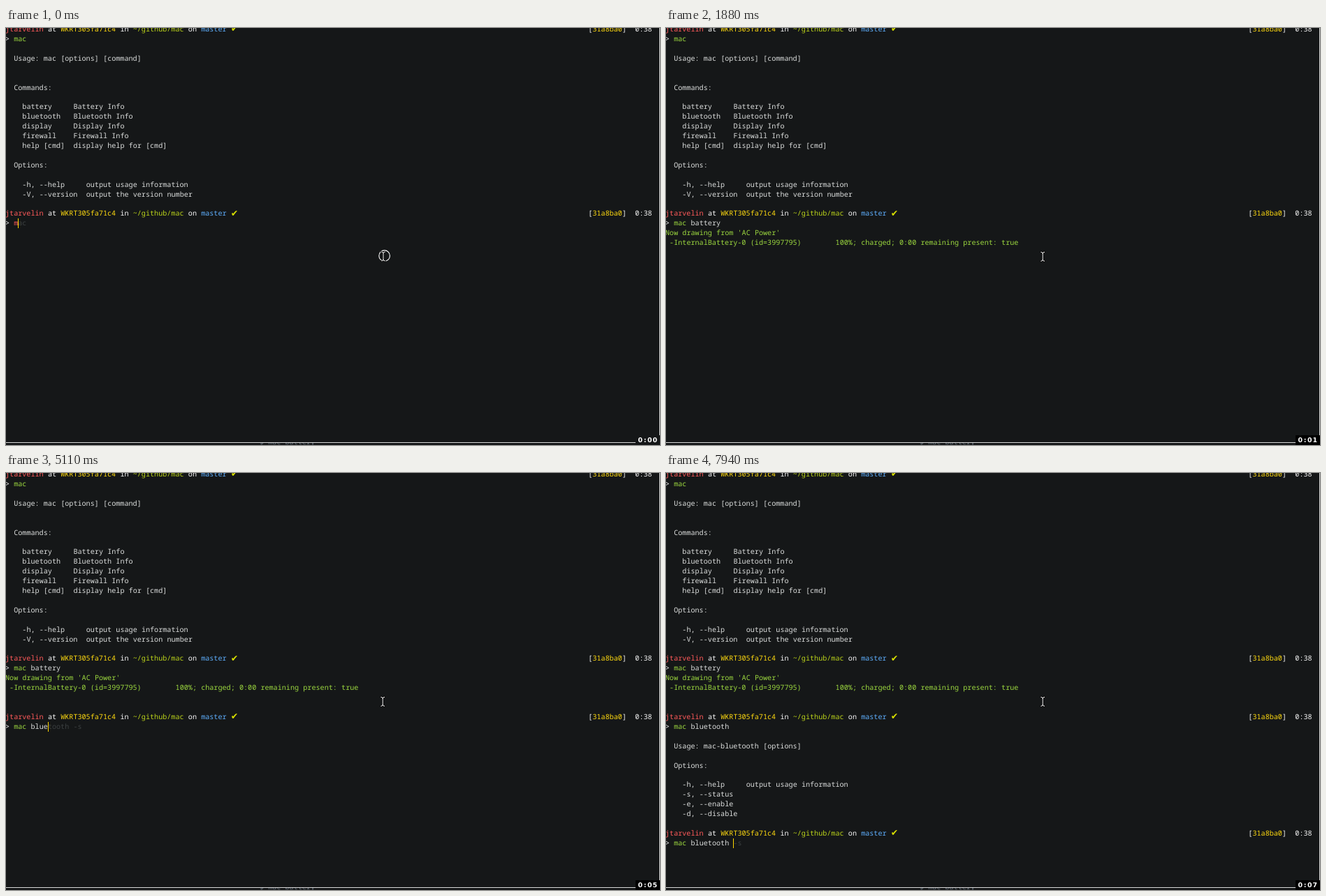
Recreate the animation shown at these times as an HTML page. Size 936 by 598 pixels, loop 8 s.

```html
<!DOCTYPE html>
<html lang="en">
<head>
<meta charset="utf-8">
<title>Terminal session</title>
<style>
  html, body { margin: 0; width: 100%; height: 100%; overflow: hidden; background: #151718; }
  svg { display: block; width: 936px; height: 598px; }
  text { font: 500 10.15px "Noto Sans Mono", "DejaVu Sans Mono", monospace; text-rendering: geometricPrecision; }
  .check { font: 12.5px "DejaVu Sans", sans-serif; }
  .clock text { font: bold 9.4px "DejaVu Sans", sans-serif; fill: #fff; }
</style>
</head>
<body>
<svg viewBox="0 0 936 598">
  <rect width="936" height="598" fill="#151718"/>
  <g id="screen"></g>
  <g id="pointer" fill="none" stroke-linecap="round">
    <circle id="ring" cx="1.6" cy="-.8" r="7.8" stroke="#fff" stroke-width="1.1"/>
    <path d="M-2.5-6.5Q0-6.5 0-4.5Q0-6.5 2.5-6.5M0-4.5V4.5M-2.5 6.5Q0 6.5 0 4.5Q0 6.5 2.5 6.5" stroke="#000" stroke-width="2.6"/>
    <path d="M-2.5-6.5Q0-6.5 0-4.5Q0-6.5 2.5-6.5M0-4.5V4.5M-2.5 6.5Q0 6.5 0 4.5Q0 6.5 2.5 6.5" stroke="#fff"/>
  </g>
  <clipPath id="below"><rect y="595" width="936" height="3"/></clipPath>
  <g clip-path="url(#below)">
    <text x="363" y="597" fill="#66717a">$ mac battery</text>
  </g>
  <rect y="594" width="936" height="1" fill="#d8d8d8"/>
  <rect x="935" width="1" height="595" fill="#d8d8d8"/>
  <g class="clock">
    <rect id="clockBox" x="901" y="584" width="35" height="14"/>
    <text x="904.4" y="594">0</text>
    <text x="912.8" y="594">:</text>
    <text x="918" y="594">0</text>
    <text id="seconds" x="925.6" y="594">0</text>
  </g>
</svg>
<script>
const LOOP = 8000, CELL = 6.09, LINE = 13.92, LEFT = -1, TOP = -5.4;
const C = {
  text: '#dcdedd', white: '#fafafa', red: '#ff5a5a', yellow: '#ffda10', path: '#bcd41a',
  blue: '#5fb0ff', check: '#d9e000', green: '#9cd83f', hint: '#3c4041', cursor: '#ffd700'
};
const $ = id => document.getElementById(id);
const colX = col => LEFT + col * CELL;
const rowY = row => TOP + row * LINE;

function add(parent, tag, attrs, content = '') {
  const node = document.createElementNS('http://www.w3.org/2000/svg', tag);
  for (const key in attrs) node.setAttribute(key, attrs[key]);
  node.textContent = content;
  return parent.appendChild(node);
}

// Every word starts on its own terminal column.
function put(group, row, col, string, fill = C.text) {
  for (const word of string.matchAll(/\S+/g))
    add(group, 'text', { x: colX(col + word.index), y: rowY(row) + 10.4, fill }, word[0]);
}

function prompt(group, row) {
  let col = 0;
  const parts = [['jtarvelin', C.red], ['at', C.white], ['WKRT305fa71c4', C.yellow], ['in', C.white],
    ['~/github/mac', C.path], ['on', C.white], ['master', C.blue]];
  for (const [word, color] of parts) {
    put(group, row, col, word, color);
    col += word.length + 1;
  }
  add(group, 'text', { class: 'check', x: colX(col), y: rowY(row) + 10.8, fill: C.check }, '✔');
  put(group, row, 137, '[', C.white);
  put(group, row, 138, '31a8ba0', C.yellow);
  put(group, row, 145, ']  0:38', C.white);
  put(group, row + 1, 0, '>', C.white);
}

function lines(group, row, list, color) {
  list.forEach((line, i) => put(group, row + i, 0, line, color));
}

const blocks = [];
function block(from, draw) {
  const group = add($('screen'), 'g', {});
  draw(group);
  blocks.push({ from, group });
}

block(0, g => {
  prompt(g, 0);
  put(g, 1, 2, 'mac', C.green);
  lines(g, 3, [
    '  Usage: mac [options] [command]', '', '',
    '  Commands:', '',
    '    battery     Battery Info',
    '    bluetooth   Bluetooth Info',
    '    display     Display Info',
    '    firewall    Firewall Info',
    '    help [cmd]  display help for [cmd]', '',
    '  Options:', '',
    '    -h, --help     output usage information',
    '    -V, --version  output the version number'
  ]);
  prompt(g, 19);
});
block(1880, g => lines(g, 21, [
  "Now drawing from 'AC Power'",
  ' -InternalBattery-0 (id=3997795)        100%; charged; 0:00 remaining present: true'
], C.green));
block(2010, g => prompt(g, 25));
block(6450, g => lines(g, 28, [
  '  Usage: mac-bluetooth [options]', '',
  '  Options:', '',
  '    -h, --help     output usage information',
  '    -s, --status',
  '    -e, --enable',
  '    -d, --disable'
]));
block(6600, g => prompt(g, 37));

// Each key: time, typed text, suggested rest, cursor shown.
const inputs = [
  { row: 20, keys: [
    [0, 'm', 'ac'], [150, 'mac', ''], [300, 'mac ', 'battery'], [600, 'mac ba', 'ttery'],
    [750, 'mac bat', 'tery'], [900, 'mac batt', 'ery'], [1190, 'mac batte', 'ry'],
    [1320, 'mac batter', 'y'], [1440, 'mac battery', ''], [1730, 'mac battery', '', false]
  ] },
  { row: 26, keys: [
    [2120, '', ''], [3320, 'm', ''], [3620, 'ma', 'c battery'], [3770, 'mac', ' battery'],
    [4220, 'mac ', 'battery'], [4670, 'mac b', 'attery'], [4820, 'mac bl', 'uetooth -s'],
    [4970, 'mac blu', 'etooth -s'], [5110, 'mac blue', 'tooth -s'], [5260, 'mac bluet', 'ooth -s'],
    [5410, 'mac bluetoo', 'th -s'], [5560, 'mac bluetooth', ' -s'], [6300, 'mac bluetooth', '', false]
  ] },
  { row: 38, keys: [
    [6600, '', ''], [7340, 'm', 'ac bluetooth'], [7490, 'ma', 'c bluetooth'], [7940, 'mac bluetooth ', '-s']
  ] }
];
for (const input of inputs) input.group = add($('screen'), 'g', {});

const ticks = [1040, 2010, 3170, 4070, 5110, 6160, 7050];

function drawInput({ row, group }, key) {
  group.replaceChildren();
  if (!key) return;
  const [, typed, hint, cursor = true] = key;
  const end = 2 + typed.length;
  put(group, row, 2, typed.slice(0, 3), typed.startsWith('mac') ? C.green : C.red);
  put(group, row, 5, typed.slice(3));
  put(group, row, end, hint, C.hint);
  if (cursor) add(group, 'rect', {
    x: Math.round(colX(end)), y: Math.round(rowY(row)), width: 1, height: 14,
    fill: typed ? C.cursor : C.text
  });
}

function render(t) {
  for (const { from, group } of blocks) group.style.display = t >= from ? '' : 'none';
  for (const input of inputs) {
    const key = input.keys.findLast(k => k[0] <= t);
    if (key !== input.shown) drawInput(input, key);
    input.shown = key;
  }
  const second = ticks.filter(tick => tick <= t).length;
  $('seconds').textContent = second;
  $('clockBox').setAttribute('fill', second ? '#000' : '#151718');
  $('ring').style.display = t < 150 ? '' : 'none';
  $('pointer').setAttribute('transform', `translate(${t < 150 ? '540 327.5' : '539.2 327.8'})`);
}

const start = performance.now();
function frame() {
  render((performance.now() - start) % LOOP);
  requestAnimationFrame(frame);
}
frame();
</script>
</body>
</html>
```
